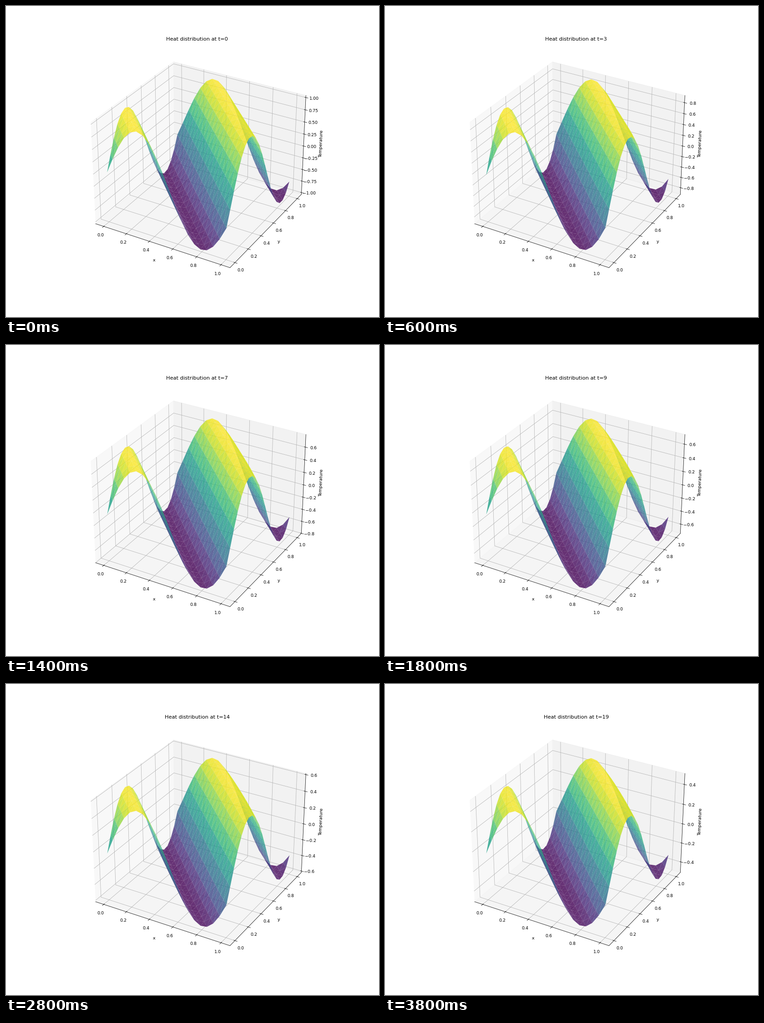
Recreate the animation shown at these times as a matplotlib script. Size 820 by 683 pixels, loop 4 s.

```python
import numpy as np
import matplotlib.pyplot as plt
from matplotlib.animation import FuncAnimation

N = 20            # nodes per side
STEPS = 20        # time steps in one loop
RATE = 0.1925     # diffusivity * dt / dx^2
WAVE = 5.88       # wave number of the starting profile

axis = np.linspace(0, 1, N)
X, Y = np.meshgrid(axis, axis)


def diffuse(u):
    """One explicit heat step with periodic edges."""
    near = sum(np.roll(u, s, axis=a) for a in (0, 1) for s in (-1, 1))
    return u + RATE * (near - 4 * u)


def grid_triangles(n):
    """Split every grid cell along its x + y = const diagonal."""
    a = (np.arange(n - 1)[:, None] * n + np.arange(n - 1)).ravel()
    lower = np.column_stack([a, a + 1, a + n])
    upper = np.column_stack([a + 1, a + n + 1, a + n])
    return np.vstack([lower, upper])


states = [np.sin(WAVE * (X + Y))]
for _ in range(STEPS - 1):
    states.append(diffuse(states[-1]))

triangles = grid_triangles(N)

fig = plt.figure(figsize=(12, 9.99513), dpi=820 / 12)
ax = fig.add_subplot(projection="3d")


def update(t):
    ax.clear()
    ax.plot_trisurf(X.ravel(), Y.ravel(), states[t].ravel(),
                    triangles=triangles, cmap="viridis", alpha=0.8)
    ax.set_title(f"Heat distribution at t={t}")
    ax.set_xlabel("x")
    ax.set_ylabel("y")
    ax.set_zlabel("Temperature")


anim = FuncAnimation(fig, update, frames=STEPS, interval=200,
                     repeat=True, repeat_delay=0)
plt.show()
```
